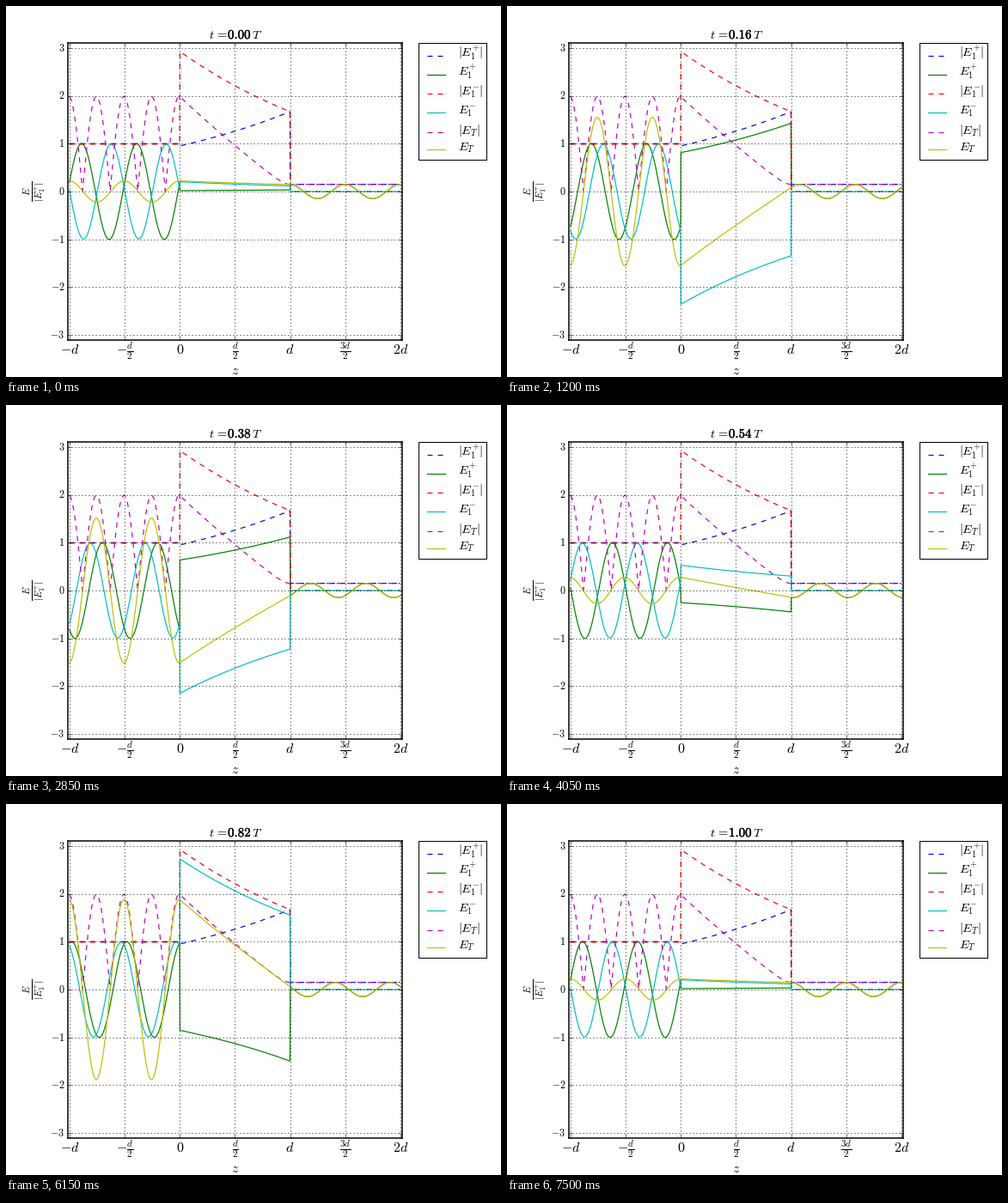
A matplotlib script for the animation above (7.65 s loop, 576 by 432 pixels).

```python
import numpy as np
import matplotlib.pyplot as plt
from matplotlib import patheffects
from matplotlib.animation import FuncAnimation

W, H = 576, 432
STEPS = 50

plt.style.use("classic")
plt.rcParams.update({
    "figure.dpi": 72, "savefig.dpi": "figure",
    "figure.facecolor": "white", "mathtext.fontset": "cm",
    "lines.linewidth": 1.2, "axes.linewidth": 1.5, "grid.linewidth": 0.9,
})

fig = plt.figure(figsize=(W / 72, H / 72), dpi=72)
ax = fig.add_axes([0.125, 0.1, 0.675, 0.8])


def put(x, y, text, size, **kw):
    """Place text with its baseline at pixel (x, y), y measured from the top."""
    kw = {"ha": "center", "va": "baseline", **kw}
    return fig.text(x / W, 1 - y / H, text, fontsize=size, **kw)


# Wave through a thin evanescent layer 0 < z < d; lengths are in units of d.
k = 4 * np.pi
kappa = k * np.sqrt(0.002)
ratio = k / kappa
phase = 0.025

z = np.linspace(-1, 2, 1200)
before, after = z < 0, z > 1

cosh, sinh = np.cosh(kappa), np.sinh(kappa)
field0 = cosh - 1j * ratio * sinh
slope0 = cosh + 1j * sinh / ratio
incident, reflected = (field0 + slope0) / 2, (field0 - slope0) / 2
scale = np.exp(1j * phase) / abs(incident)

forward = scale * np.select(
    [before, after],
    [incident * np.exp(1j * k * z), np.exp(1j * k * (z - 1))],
    (1 + 1j * ratio) / 2 * np.exp(kappa * (z - 1)))
backward = scale * np.select(
    [before, after],
    [reflected * np.exp(-1j * k * z), 0 * z],
    (1 - 1j * ratio) / 2 * np.exp(-kappa * (z - 1)))

curves = [
    (forward, "b", "g", "E_1^{+}"),
    (backward, "r", "c", "E_1^{-}"),
    (forward + backward, "m", "y", "E_T"),
]

ax.set_xlim(-1.015, 2.015)
ax.set_ylim(-3.1, 3.1)
ax.set_xticks(np.arange(-1, 2.1, 0.5), [""] * 7)
ax.set_yticks(range(-3, 4), [""] * 7)
ax.grid(True)

x_labels = ["-d", r"-\frac{d}{2}", "0", r"\frac{d}{2}", "d",
            r"\frac{3d}{2}", "2d"]
for i, label in enumerate(x_labels):
    put(74 + 64.16 * i, 405, f"${label}$", 16)
for value in range(-3, 4):
    put(68.3, 219.8 - 55.74 * value, f"${value}$", 12, ha="right")

put(267, 429.4, "$z$", 16)
put(33, 216, r"$\frac{E}{|E_1^{+}|}$", 16, va="center", rotation=90)

put(257.5, 38, r"$t\hspace{0.116}=\hspace{-0.2}$", 14.4, ha="right")
put(286.5, 38, "$T$", 14.4, ha="left")
clock = put(272, 38, "", 15, path_effects=[
    patheffects.withStroke(linewidth=0.4, foreground="black")])


def legend_row(y, color, style, label):
    fig.add_artist(plt.Line2D([490 / W, 511 / W], [1 - y / H] * 2,
                              color=color, ls=style))
    put(526, y + 2, f"${label}$", 14.4, ha="left")


fig.add_artist(plt.Rectangle((480 / W, 1 - 179.3 / H), 79.2 / W, 136.3 / H,
                             fc="white", ec="black", lw=1))
moving = []
rows = [(57.7, 79.7), (101.7, 123.7), (146.7, 166.7)]
for (wave, dashed, solid, name), (y1, y2) in zip(curves, rows):
    ax.plot(z, abs(wave), dashed + "--")
    line, = ax.plot(z, wave.real, solid)
    moving.append((line, wave))
    legend_row(y1, dashed, "--", f"|{name}|")
    legend_row(y2, solid, "-", name)


def update(frame):
    t = frame / STEPS
    turn = np.exp(-2j * np.pi * t)
    for line, wave in moving:
        line.set_ydata((wave * turn).real)
    clock.set_text(rf"$\mathbf{{{t:.2f}}}$")
    return [line for line, _ in moving] + [clock]


anim = FuncAnimation(fig, update, frames=STEPS + 1, interval=150,
                     repeat=True, repeat_delay=0)
plt.show()
```
